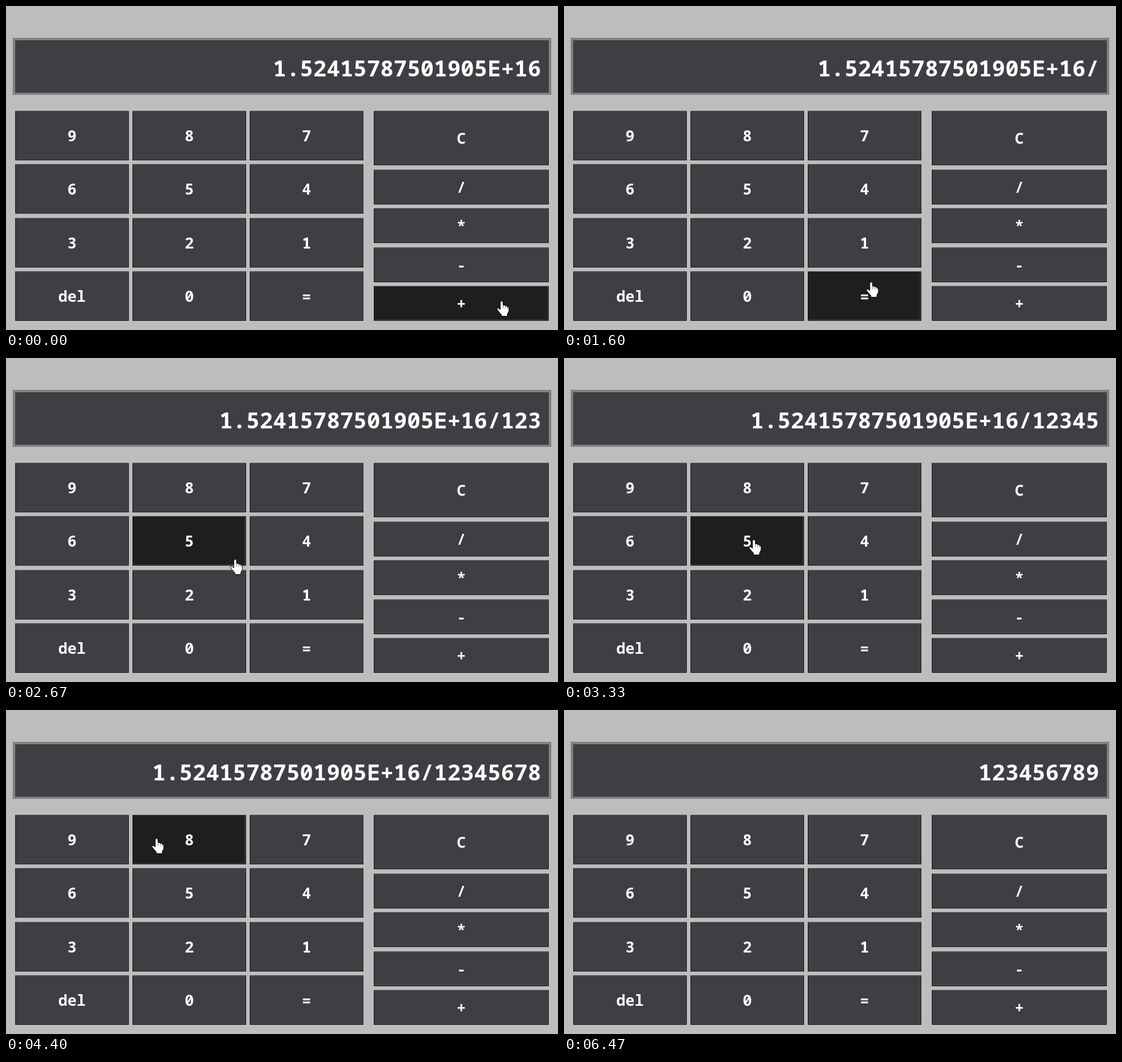
Recreate the animation shown at these times as an HTML page. Size 899 by 529 pixels, loop 7140 ms.

```html
<!DOCTYPE html>
<html lang="en">
<head>
<meta charset="utf-8">
<title>Calculator</title>
<style>
  html, body { margin: 0; width: 100%; height: 100%; overflow: hidden; background: #bdbdbd; }
  svg { display: block; }
  text { font-family: "Noto Sans Mono", "DejaVu Sans Mono", monospace; font-weight: 700; fill: #fff; white-space: pre; }
  .key { font-size: 25px; text-anchor: middle; }
  #screen { font-size: 36.4px; text-anchor: end; }
</style>
</head>
<body>
<svg id="stage" width="899" height="529" viewBox="0 0 899 529">
  <rect width="899" height="529" fill="#bdbdbd"/>
  <rect x="11" y="52" width="877" height="93" fill="#808080"/>
  <rect x="15" y="56" width="869" height="85.5" fill="#3f3e43"/>
  <text id="screen" x="871.5" y="114.5"></text>
  <g id="keys"></g>
  <g id="hand" stroke="#000" stroke-linejoin="round">
    <path fill="#fff" d="M-2 2Q0-1 2.6 2V7.4Q5.5 6.8 6.4 8.6Q9 8 9.6 10Q12 10 12 12.4V17.5L9.6 22V25.5H-.2V23L-4.6 18L-7.4 14Q-7 10 -2 14.6Z"/>
    <path fill="none" stroke="#555" stroke-width=".8" d="M2.7 8v4.5M6.3 9v4M9.5 10v3"/>
  </g>
  <path id="sizer" fill="#fff" stroke="#000" stroke-linejoin="round" d="M0 .5L4.5 5v1.5h-3V20h-3V6.5h-3V5Z"/>
</svg>
<script>
const LOOP = 7140, BOTTOM = 514, RESULT_TICK = 83;
const BASE = "1.52415787501905E+16", RESULT = "123456789";
const $ = id => document.getElementById(id);

function add(tag, attrs, parent) {
  const el = document.createElementNS("http://www.w3.org/2000/svg", tag);
  for (const name in attrs) el.setAttribute(name, attrs[name]);
  return parent.appendChild(el);
}

const keys = {};
function addKey(label, x, y, w, h) {
  const g = $("keys");
  const face = add("rect", { x: x + .5, y: y + .5, width: w - 1, height: h - 1, stroke: "#111" }, g);
  add("path", { d: `M${x} ${y + .5}h${w}`, stroke: "#55555a" }, g);
  add("path", { d: `M${x + 1} ${y + h - 1.5}h${w - 2}M${x + w - 1.5} ${y + 1}v${h - 2}`, stroke: "#4b4a4f" }, g);
  add("text", { class: "key", x: x + w / 2, y: y + h / 2 + 9.5 }, g).textContent = label;
  keys[label] = { face, x, y, w, h };
}

[["9", "8", "7"], ["6", "5", "4"], ["3", "2", "1"], ["del", "0", "="]].forEach((row, r) =>
  row.forEach((label, c) => addKey(label, 15 + 191 * c, Math.round(171 + 87.4 * r), 185, 81)));
addKey("C", 599, 171, 285, 89);
["/", "*", "-", "+"].forEach((label, i) => addKey(label, 599, Math.round(266.5 + 63.6 * i), 285, 57));

// Ticks run at fifteen a second.
// visits: key, tick of arrival, tick of press and departure
const visits = [
  ["/", 7, 12], ["1", 26, 27], ["2", 31, 34], ["3", 36, 37], ["4", 43, 46], ["5", 49, 50],
  ["6", 53, 54], ["7", 58, 59], ["8", 62, 65], ["9", 68, 69], ["=", 79, 87]
];
// points passed between keys: tick, x, y
const via = [
  [0, 807, 481], [2, 773, 468], [4, 773, 468], [15, 223, 386], [17, 130, 388], [22, 478, 400],
  [24, 500, 450], [40, 373, 328], [57, 468, 228], [75, 521, 516], [90, 500, 477], [93, 500, 477], [97, 514, 545]
];
const path = via.concat(visits.flatMap(([label, from, to]) => {
  const { x, y, w, h } = keys[label];
  return [from, to].map(k => [k, x + w / 2 + 10, y + h / 2 - 3]);
})).sort((a, b) => a[0] - b[0]);

const tickStart = k => Math.round(k * 20 / 3) * 10;
function tickAt(t) {
  const k = Math.floor(t * 3 / 200);
  if (t < tickStart(k)) return k - 1;
  return t >= tickStart(k + 1) ? k + 1 : k;
}

function pointerAt(k) {
  const i = path.findIndex(p => p[0] > k);
  if (i < 0) return path[path.length - 1].slice(1);
  const [k0, x0, y0] = path[i - 1], [k1, x1, y1] = path[i];
  const mix = (a, b) => Math.round(a + (b - a) * (k - k0) / (k1 - k0));
  return [mix(x0, x1), mix(y0, y1)];
}

function screenAt(k) {
  if (k >= RESULT_TICK) return RESULT;
  return BASE + visits.filter(v => v[2] <= k).map(v => v[0]).join("");
}

function draw(k) {
  const [x, y] = pointerAt(k), resizing = y >= BOTTOM;
  for (const b of Object.values(keys)) {
    const over = x >= b.x && x < b.x + b.w && y >= b.y && y < b.y + b.h;
    b.face.setAttribute("fill", over ? "#1e1e1e" : "#3f3e43");
  }
  $("screen").textContent = screenAt(k);
  for (const [id, shown] of [["hand", !resizing], ["sizer", resizing]]) {
    $(id).setAttribute("transform", `translate(${x} ${y})`);
    $(id).setAttribute("visibility", shown ? "visible" : "hidden");
  }
}

const start = performance.now();
let last = -1;
function frame() {
  const k = tickAt((performance.now() - start) % LOOP);
  if (k !== last) draw(last = k);
  requestAnimationFrame(frame);
}
frame();
</script>
</body>
</html>
```
